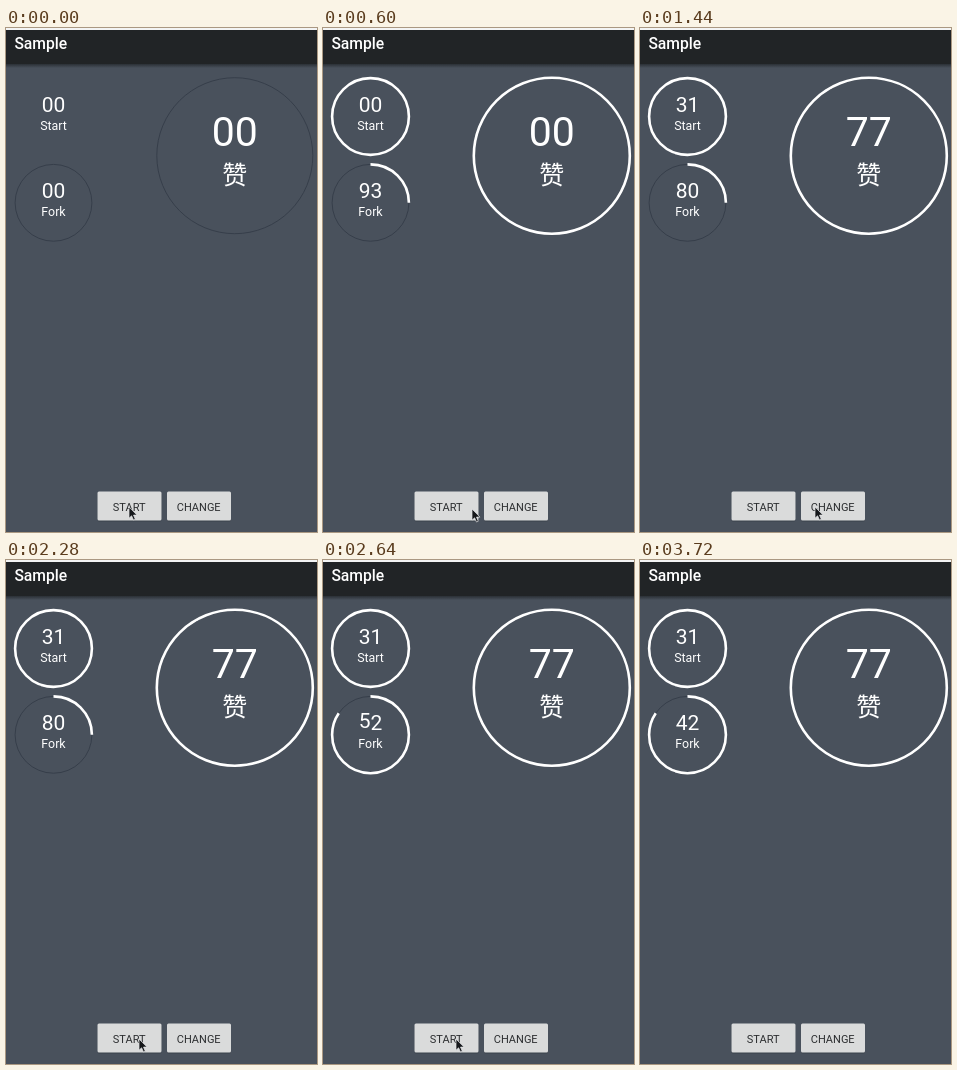
Animation of 311x504 px, one loop 3840 ms. Source, as an HTML page:

```html
<!DOCTYPE html>
<html lang="en">
<head>
<meta charset="utf-8">
<title>Sample</title>
<style>
  html, body { margin: 0; width: 100%; height: 100%; overflow: hidden; background: #49515c; }
  svg { display: block; width: 311px; height: 504px; }
  text { font-family: Roboto, "Noto Sans CJK SC", "Noto Sans CJK", sans-serif; fill: #fff; }
  .mid { text-anchor: middle; }
  .button text { font-size: 11px; fill: #2c2e30; }
  .ring, .track { fill: none; }
  .ring { stroke: #fff; stroke-width: 2.6; }
  .track { stroke: #363e4a; stroke-width: 1; }
</style>
</head>
<body>
<svg id="stage" viewBox="0 0 311 504">
  <defs>
    <linearGradient id="shade" x2="0" y2="1">
      <stop offset="0" stop-color="#2b3036"/>
      <stop offset="1" stop-color="#49515c"/>
    </linearGradient>
  </defs>
  <rect width="311" height="504" fill="#49515c"/>
  <rect width="311" height="2" fill="#f3f4f4"/>
  <rect y="2" width="311" height="34" fill="#212426"/>
  <rect y="36" width="311" height="4" fill="url(#shade)"/>
  <text x="8.4" y="21" font-size="15.7" font-weight="500">Sample</text>
  <g id="dials"></g>
  <g id="buttons"></g>
  <path id="cursor" d="M0 0V11.2L2.6 8.8L4.5 13L6.3 12.2L4.5 8.1H8Z"
        fill="#15171a" stroke="#e4e6e8" stroke-width=".7"/>
</svg>
<script>
const LOOP = 3840, TICK = 120, SWEEP = 300;
const NS = 'http://www.w3.org/2000/svg';
const $ = id => document.getElementById(id);

function add(parent, tag, attrs, text) {
  const el = document.createElementNS(NS, tag);
  for (const k in attrs) el.setAttribute(k, attrs[k]);
  if (text) el.textContent = text;
  return parent.appendChild(el);
}

// rolls: [start, ms per digit step, from, to]; sweeps: [start, share of the circle]
const dials = [
  { x: 47.5, y: 88.5, r: 38.4, size: 21, base: 84, label: 'Start', labelSize: 12.4, labelBase: 102,
    rolls: [[1032, 96, '00', '31']], sweeps: [[270, 1], [2310, 1]] },
  { x: 47.5, y: 174.8, r: 38.4, size: 21, base: 170, label: 'Fork', labelSize: 12.4, labelBase: 188, track: true,
    rolls: [[270, 36, '00', '93'], [1032, 96, '93', '80'], [2358, 96, '80', '42']],
    sweeps: [[270, .25], [2310, .845]] },
  { x: 228.8, y: 127.7, r: 78, size: 41, base: 118, label: '赞', labelSize: 25, labelBase: 155.5, track: true,
    rolls: [[850, 30, '00', '77']], sweeps: [[270, 1], [2310, 1]] }
];

// [time, x, y] of the pointer tip
const path = [
  [0, 123, 479], [240, 123, 479], [400, 134, 486], [600, 149, 481], [780, 160, 481],
  [960, 175, 479], [1560, 175, 479], [1920, 150, 481], [2160, 133, 479], [2880, 133, 479],
  [3000, 150, 468], [3240, 220, 380], [3480, 289, 168], [3600, 220, 380]
];

function buildDial(d, i) {
  const g = add($('dials'), 'g', {});
  const circle = { cx: d.x, cy: d.y, r: d.r };
  if (d.track) add(g, 'circle', { ...circle, class: 'track' });
  d.ring = add(g, 'circle', {
    ...circle, class: 'ring', pathLength: 1, transform: `rotate(-90 ${d.x} ${d.y})`
  });
  d.pitch = d.size * 1.16;
  const clip = add(g, 'clipPath', { id: 'window' + i });
  add(clip, 'rect', { x: d.x - d.size, y: d.base - d.size * 1.05, width: d.size * 2, height: d.size * 1.25 });
  const win = add(g, 'g', { 'clip-path': `url(#window${i})`, 'font-size': d.size });
  d.columns = [-1, 1].map(side => [0, 1].map(() =>
    add(win, 'text', { x: d.x + side * d.size * .281, class: 'mid' })));
  add(g, 'text', { x: d.x, y: d.labelBase, class: 'mid', 'font-size': d.labelSize }, d.label);
}

function buildButton(x, label) {
  const g = add($('buttons'), 'g', { class: 'button' });
  add(g, 'rect', { x, y: 464.5, width: 64, height: 29, rx: 1.5, fill: '#3b424b' });
  add(g, 'rect', { x, y: 463.5, width: 64, height: 29, rx: 1.5, fill: '#dadbdb' });
  add(g, 'text', { x: x + 31.7, y: 482.6, class: 'mid' }, label);
}

const latest = (list, t) => list.filter(e => e[0] <= t).pop();

function drawDial(d, t) {
  const sweep = latest(d.sweeps, t);
  const share = sweep ? sweep[1] * Math.min(1, (t - sweep[0]) / SWEEP) : 0;
  d.ring.style.visibility = share ? 'visible' : 'hidden';
  d.ring.setAttribute('stroke-dasharray', `${share} 2`);

  const [start, step, from, to] = latest(d.rolls, t) || [t, 1, '00', '00'];
  d.columns.forEach((pair, i) => {
    const gap = to[i] - from[i];
    const value = +from[i] + Math.sign(gap) * Math.min(Math.abs(gap), (t - start) / step);
    const digit = Math.floor(value);
    pair.forEach((el, k) => {
      el.textContent = (digit + k) % 10;
      el.setAttribute('y', d.base + (digit + k - value) * d.pitch);
    });
  });
}

function drawCursor(t) {
  const next = path.findIndex(p => p[0] > t);
  const last = path[path.length - 1];
  $('cursor').style.visibility = t > last[0] ? 'hidden' : 'visible';
  const b = next < 0 ? last : path[next];
  const a = next < 0 ? last : path[next - 1];
  const u = a === b ? 0 : (t - a[0]) / (b[0] - a[0]);
  const mix = k => a[k] + (b[k] - a[k]) * u;
  $('cursor').setAttribute('transform', `translate(${mix(1)} ${mix(2)})`);
}

const begin = performance.now();
function frame() {
  const now = (performance.now() - begin) % LOOP;
  const t = now < 2 * TICK ? 0 : Math.floor(now / TICK) * TICK;
  dials.forEach(d => drawDial(d, t));
  drawCursor(t);
  requestAnimationFrame(frame);
}

dials.forEach(buildDial);
buildButton(91.5, 'START');
buildButton(161, 'CHANGE');
frame();
</script>
</body>
</html>
```
